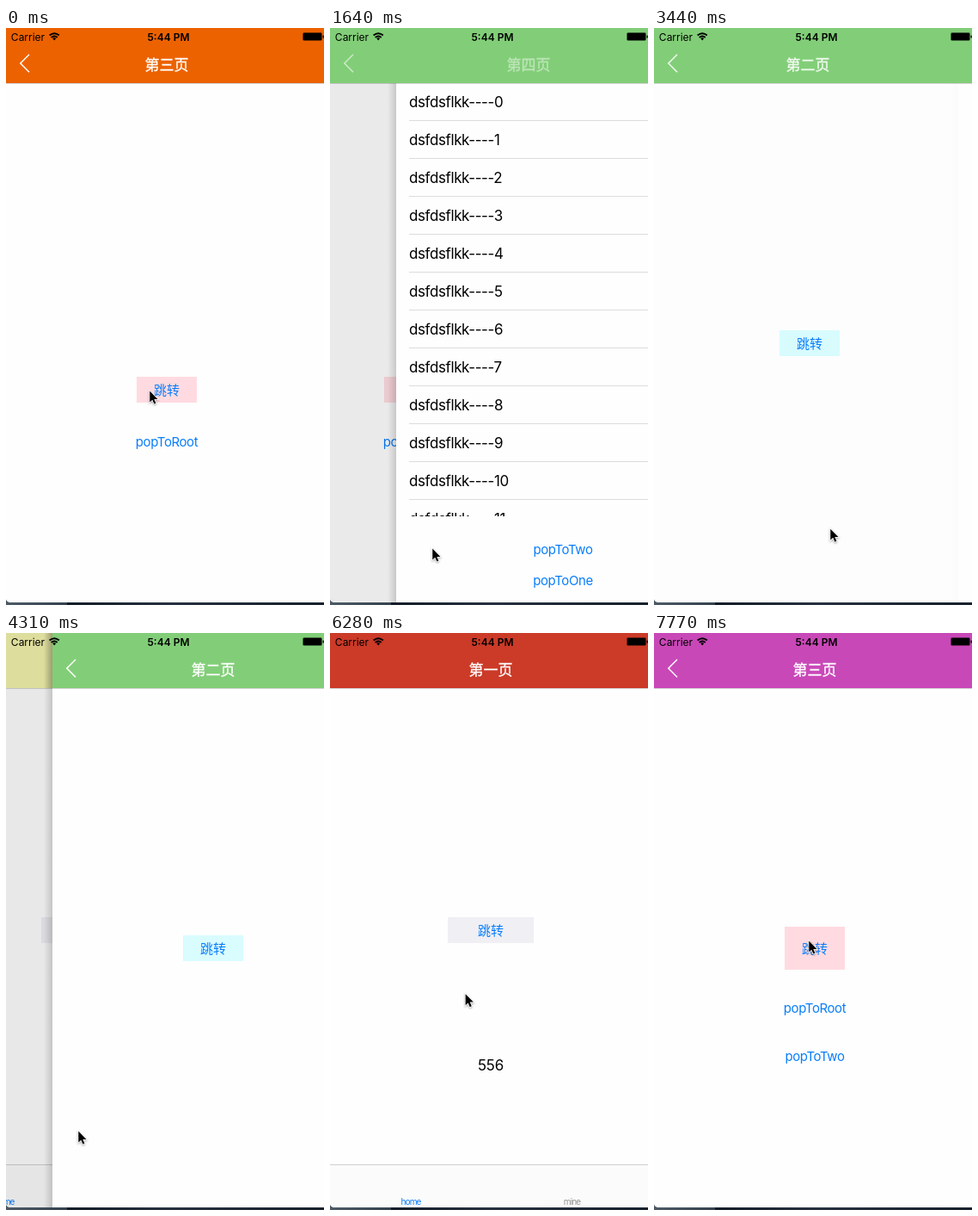
An HTML page for the animation above (8000 ms loop, 370 by 670 pixels).

```html
<!DOCTYPE html>
<html lang="zh">
<head>
<meta charset="utf-8">
<title>Navigation demo</title>
<style>
html, body { margin: 0; width: 100%; height: 100%; overflow: hidden; background: #1b2531; }
body { font-family: Inter, "Noto Sans CJK SC", "Noto Sans CJK", sans-serif; }
#stage { position: absolute; left: 0; top: 0; width: 370px; height: 670px; overflow: hidden;
  background: linear-gradient(90deg, #4d5a66 0, #35424e 71px, #141c28 71px, #26313f 190px, #17202c 370px); }
#phone { position: absolute; left: 0; top: 0; width: 375px; height: 667px; overflow: hidden;
  border-bottom-left-radius: 5px; background: #fefefe; }
.page, .bar, .dim, .item { position: absolute; }
.page { left: 0; top: 0; width: 375px; height: 667px; background: #fefefe; }
.page + .page::before, #bar::before { content: ""; position: absolute; left: -10px; top: 0; width: 10px; height: 100%;
  opacity: var(--shade); background: linear-gradient(90deg, rgba(0,0,0,0), rgba(0,0,0,.18)); }
.dim { left: 0; top: 0; width: 100%; height: 100%; background: #000; opacity: 0; }
.bar { left: 0; top: 0; width: 375px; height: 64px; box-shadow: 0 1px 0 rgba(0,0,0,.17); }
.item { display: flex; align-items: center; justify-content: center; transform: translate(-50%, -50%); white-space: nowrap; }
.link { font-size: 15px; color: #087dfb; letter-spacing: -.4px; }
.button { box-sizing: border-box; padding-bottom: 2px; letter-spacing: 0; }
.title { font-size: 17px; font-weight: 500; color: #fff; -webkit-text-stroke: .35px #fff; }
.tab { font-size: 10px; letter-spacing: -.9px; }
.table { position: absolute; left: 0; top: 64px; width: 375px; height: 503px; overflow: hidden; }
.row { margin-left: 15px; height: 43px; line-height: 44px; border-bottom: 1px solid #dcdcde;
  font-size: 17px; letter-spacing: -.4px; color: #000; }
.tabs { position: absolute; left: 0; top: 617px; width: 375px; height: 49px; background: #fbfbfb; border-top: 1px solid #cfcfcf; }
svg { position: absolute; left: 0; top: 0; overflow: visible; }
.status { font-size: 12px; color: #000; }
</style>
</head>
<body>
<div id="stage">
  <div id="phone">
    <div id="pages"></div>
    <div class="bar" id="bar">
      <svg width="40" height="64"><path id="back" d="M27 30.8L16.8 41L27 51.2" fill="none" stroke="#fff" stroke-width="1.5"/></svg>
    </div>
    <div class="item status" style="left:25.5px;top:10px">Carrier</div>
    <div class="item status" style="left:189px;top:10px;font-weight:600">5:44 PM</div>
    <svg width="375" height="20">
      <path d="M50.6 8.6Q56.2 3.9 61.8 8.6M52.7 10.9Q56.2 8 59.7 10.9" fill="none" stroke="#000" stroke-width="1.9"/>
      <path d="M54.2 12.1Q56.2 10.6 58.2 12.1L56.2 14.4Z"/>
      <rect x="345.5" y="5.5" width="22" height="9" rx="1.5" fill="none" stroke="#000" stroke-opacity=".5"/>
      <rect x="346" y="6" width="21" height="8" rx=".6"/>
      <rect x="368.5" y="8.5" width="1.3" height="3.2" rx=".6"/>
    </svg>
  </div>
  <svg id="cursor" width="14" height="22" style="filter:drop-shadow(0 1px 1px rgba(0,0,0,.35))">
    <path transform="translate(.3 .6) scale(.86)" d="M0 0V15L3.5 11.8L5.9 17.4L8.3 16.4L5.9 10.9H10.7Z" fill="#000" stroke="#fff" stroke-width="1.8" paint-order="stroke"/>
  </svg>
</div>
<script>
const W = 375, MID = 187, LOOP = 8000;
const $ = id => document.getElementById(id);

function add(parent, cls, css = {}, text = '') {
  const el = document.createElement('div');
  el.className = cls;
  el.textContent = text;
  Object.assign(el.style, css);
  parent.append(el);
  return el;
}
const label = (parent, cls, text, x, y, css) =>
  add(parent, 'item ' + cls, { left: x + 'px', top: y + 'px', ...css }, text);
const button = (parent, y, w, h, background) =>
  label(parent, 'link button', '跳转', MID, y, { width: w + 'px', height: h + 'px', background });

// Pages, bottom of the stack first
const pages = [1, 2, 3, 4].map(() => add($('pages'), 'page'));
const [one, two, three, four] = pages;

const firstBar = add(one, 'bar');
label(firstBar, 'title', '第一页', MID, 40.5);
button(one, 345, 100, 30, '#efeff4');
label(one, '', '556', MID, 501.5, { fontSize: '17px', letterSpacing: '-.3px' });
add(one, 'tabs');
label(one, 'tab', 'home', 94, 660, { color: '#087dfb' });
label(one, 'tab', 'mine', 281.5, 660, { color: '#929292' });

const twoButton = button(two, 366, 70, 30, '#d9fcff');

const threeButton = button(three, 420, 70, 30, '#ffdbe1');
const toRoot = label(three, 'link', 'popToRoot', MID, 480);
const toTwo = label(three, 'link', 'popToTwo', MID, 491);

const table = add(four, 'table');
for (let i = 0; i < 12; i++) add(table, 'row', {}, 'dsfdsflkk----' + i);
label(four, 'link', 'popToTwo', 194, 605);
label(four, 'link', 'popToOne', 194, 641);

const dims = pages.map(p => add(p, 'dim'));
const titles = ['', '第二页', '第三页', '第四页'].map(s => label($('bar'), 'title', s, MID, 40.5));

// Easing and keyframe tracks: [time, ...values, ease into this step]
const lin = u => u;
const out = u => 1 - (1 - u) ** 2;
const inq = u => u * u;
const soft = u => u * u * (3 - 2 * u);
const spring = u => u >= 1 ? 1 : 1 - (1 + 9 * u) * Math.exp(-9 * u);
const clamp = v => Math.max(0, Math.min(1, v));

function track(steps, t) {
  const n = steps.findIndex(s => s[0] > t);
  if (n === 0) return steps[0].slice(1);
  if (n < 0) return steps[steps.length - 1].slice(1);
  const a = steps[n - 1], b = steps[n];
  const last = b[b.length - 1];
  const ease = typeof last === 'function' ? last : lin;
  const u = ease((t - a[0]) / (b[0] - a[0]));
  return b.slice(1).filter(v => typeof v === 'number').map((v, i) => a[i + 1] + (v - a[i + 1]) * u);
}

// Stack depth: 3.4 means page four covers 40% of page three
const at = (page, px) => page - px / W;
const depth = [
  [0, 3], [40, 3], [600, 4, spring],
  [1250, 4], [1640, at(4, 76), inq], [1880, at(4, 310)], [2070, 3, out],
  [2680, 3], [2870, at(3, 29), inq], [3240, at(3, 180)], [3540, 2, out],
  [4150, 2], [4310, at(2, 54), inq], [4900, at(2, 290), soft], [5160, 1, out],
  [6560, 1], [7060, 2, spring],
  [7270, 2], [7770, 3, spring]
];
const pointer = [
  [0, 167, 421], [150, 167, 421], [850, 24, 605, soft],
  [1070, 3, 602, out], [1240, 3, 602], [1640, 118, 604, inq], [1880, 350, 600], [2060, 357, 598, out],
  [2410, 3, 597, soft], [2690, 3, 596], [2870, 52, 593, inq], [3240, 198, 582], [3550, 206, 581, out],
  [4020, 3, 580, soft], [4160, 3, 580], [4310, 84, 578, inq], [4900, 318, 575, soft], [4990, 320, 574],
  [5230, 249, 573, inq], [5650, 50, 645, out], [5850, 50, 645],
  [6470, 188, 354, soft], [6620, 188, 354], [6920, 188, 369, soft],
  [7180, 183, 360, soft], [7320, 183, 360], [7770, 180, 357, soft]
];
const barColor = [
  [0, 236, 98, 0], [40, 236, 98, 0], [340, 130, 206, 120, out], [5400, 130, 206, 120],
  [5401, 26, 93, 50], [7270, 26, 93, 50], [7570, 201, 72, 184, out]
];
const nudge = [[0, 0], [5400, 0], [5401, 9], [6990, 9], [7180, 0, soft]];

const rgb = c => `rgb(${c.map(Math.round)})`;
const shift = (el, x, y = 0) => { el.style.transform = `translate(${x}px, ${y}px)`; };
const offset = (el, x, y = 0) => { el.style.transform = `translate(-50%, -50%) translate(${x}px, ${y}px)`; };

function layoutThree(late) {
  threeButton.style.top = (late ? 366 : 420) + 'px';
  threeButton.style.height = (late ? 50 : 30) + 'px';
  toRoot.style.top = (late ? 435 : 480) + 'px';
  toTwo.style.display = late ? '' : 'none';
}

function draw(t) {
  const d = track(depth, t)[0];
  const gone = Math.ceil(d) - d;   // how far the top page is slid away

  pages.forEach((page, i) => {
    const gap = d - (i + 1);
    const x = gap < 0 ? Math.min(1, -gap) * W : -Math.min(1, gap) * W * .3;
    page.style.visibility = gap > -1 && gap < 1 ? 'visible' : 'hidden';
    shift(page, Math.round(x));
    dims[i].style.opacity = .1 * clamp(gap);
  });
  $('phone').style.setProperty('--shade', Math.min(1, 14 * gone) * (1 - gone));

  // The first page owns its bar; the others share one
  $('bar').style.background = rgb(track(barColor, t));
  $('bar').style.visibility = d > 1 ? 'visible' : 'hidden';
  shift($('bar'), d < 2 ? Math.round((2 - d) * W) : 0);
  firstBar.style.background = t < 5850 ? 'rgb(242,242,172)' : 'rgb(204,58,40)';

  titles.forEach((title, i) => {
    const gap = d < 2 ? (i === 1 ? 0 : 2) : i + 1 - d;
    title.style.opacity = gap >= 0 ? clamp(1 - 2.6 * gap) : clamp(1 + 1.7 * gap);
    offset(title, gap >= 0 ? gap * 214 : gap * 140);
  });
  $('back').style.opacity = d < 2 ? 1 : Math.max(.1, Math.abs(1 - 2 * gone));

  layoutThree(t > 6000);
  const n = track(nudge, t)[0];
  offset(twoButton, n, -n);
  shift($('cursor'), ...track(pointer, t));
}

const start = performance.now();
function tick() {
  draw((performance.now() - start) % LOOP);
  requestAnimationFrame(tick);
}
tick();
</script>
</body>
</html>
```
